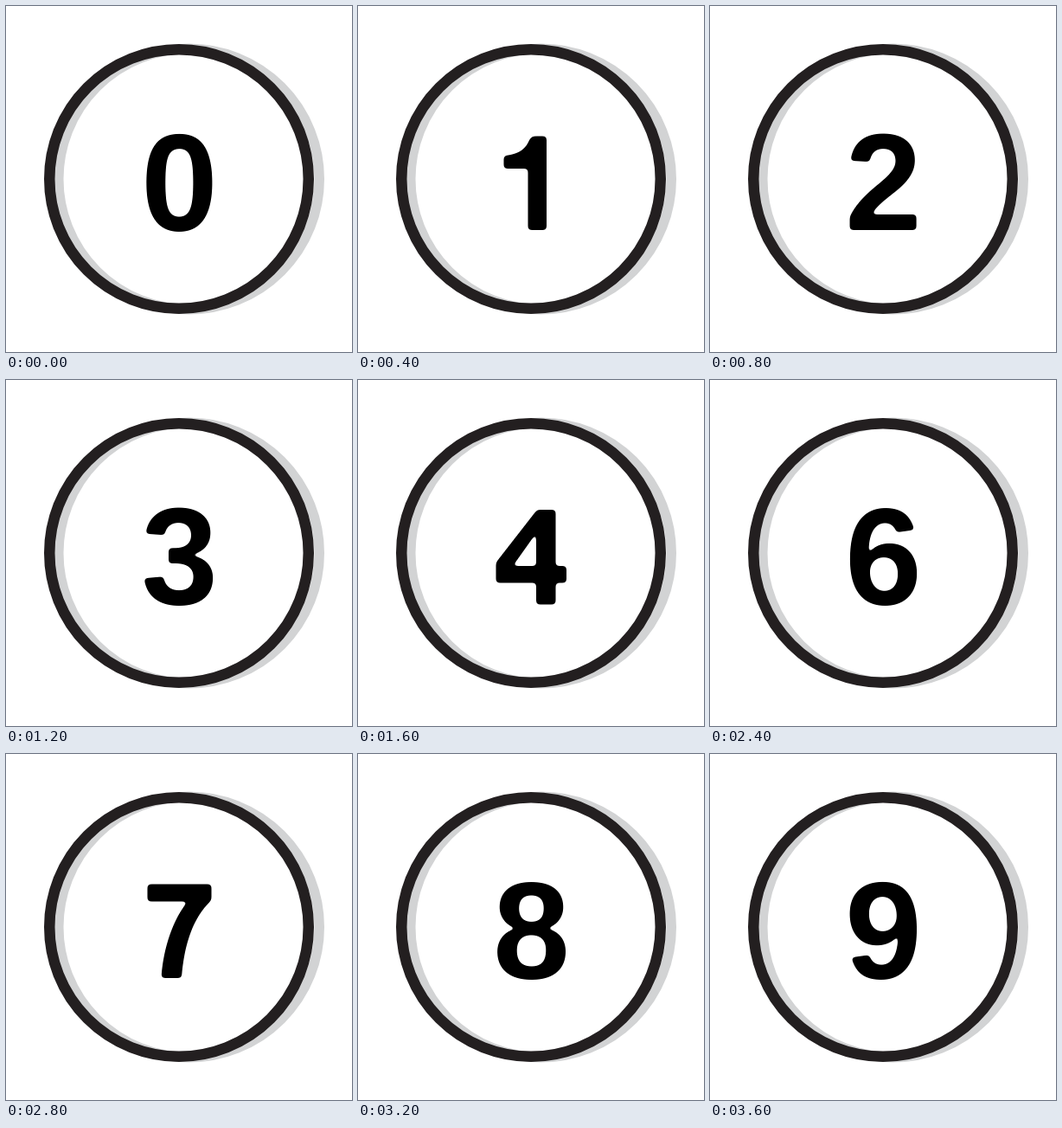
An HTML page that plays this animation: 400x400 px, repeating every 4000 ms.

```html
<!DOCTYPE html>
<html lang="en">
<head>
<meta charset="utf-8">
<title>Counter</title>
<style>
  html, body { margin: 0; width: 100%; height: 100%; overflow: hidden; background: #fff; }
  svg { display: block; width: 100%; height: 100%; }
  circle { fill: none; }
  path { fill-rule: evenodd; }
  text { font: bold 160px "Liberation Sans", Arial, sans-serif; text-anchor: middle; }
</style>
</head>
<body>
<svg viewBox="0 0 400 400">
  <!-- Blur, then sharpen: rounds every corner -->
  <filter id="soften">
    <feGaussianBlur stdDeviation="2"/>
    <feComponentTransfer><feFuncA type="linear" slope="6" intercept="-2.5"/></feComponentTransfer>
  </filter>
  <circle cx="211.5" cy="200" r="150.75" stroke="#d2d3d4" stroke-width="11.5"/>
  <circle cx="200" cy="200" r="149.75" stroke="#231f20" stroke-width="12.5"/>
  <g filter="url(#soften)">
    <text x="200.5" y="259.3">0</text>
    <path/>
  </g>
</svg>
<script>
  const STEP = 400;
  const label = document.querySelector("text");
  const path = document.querySelector("path");
  // Digits whose form differs from the font's
  const shapes = {
    1: "M203 150.5H218V259H196.5V188H168.5V173C185 172 194 166 198 155Q200 150.5 203 150.5Z",
    4: "M207 150H228.5V215H241V234.5H228.5V259.5H206V234.5H159.5V211ZM206 177V215H179Z",
    7: "M163.5 150.5H237.5V169C216 189 206 220 203 259H179.5C182 222 194 190 210 170.5H163.5Z"
  };
  let shown = -1;

  function draw(now) {
    const digit = Math.floor(now / STEP) % 10;
    if (digit !== shown) {
      shown = digit;
      const shape = shapes[digit];
      label.textContent = shape ? "" : digit;
      path.setAttribute("d", shape || "");
    }
  }

  let start;
  function tick(now) {
    start ??= now;
    draw(now - start);
    requestAnimationFrame(tick);
  }
  requestAnimationFrame(tick);
</script>
</body>
</html>
```
